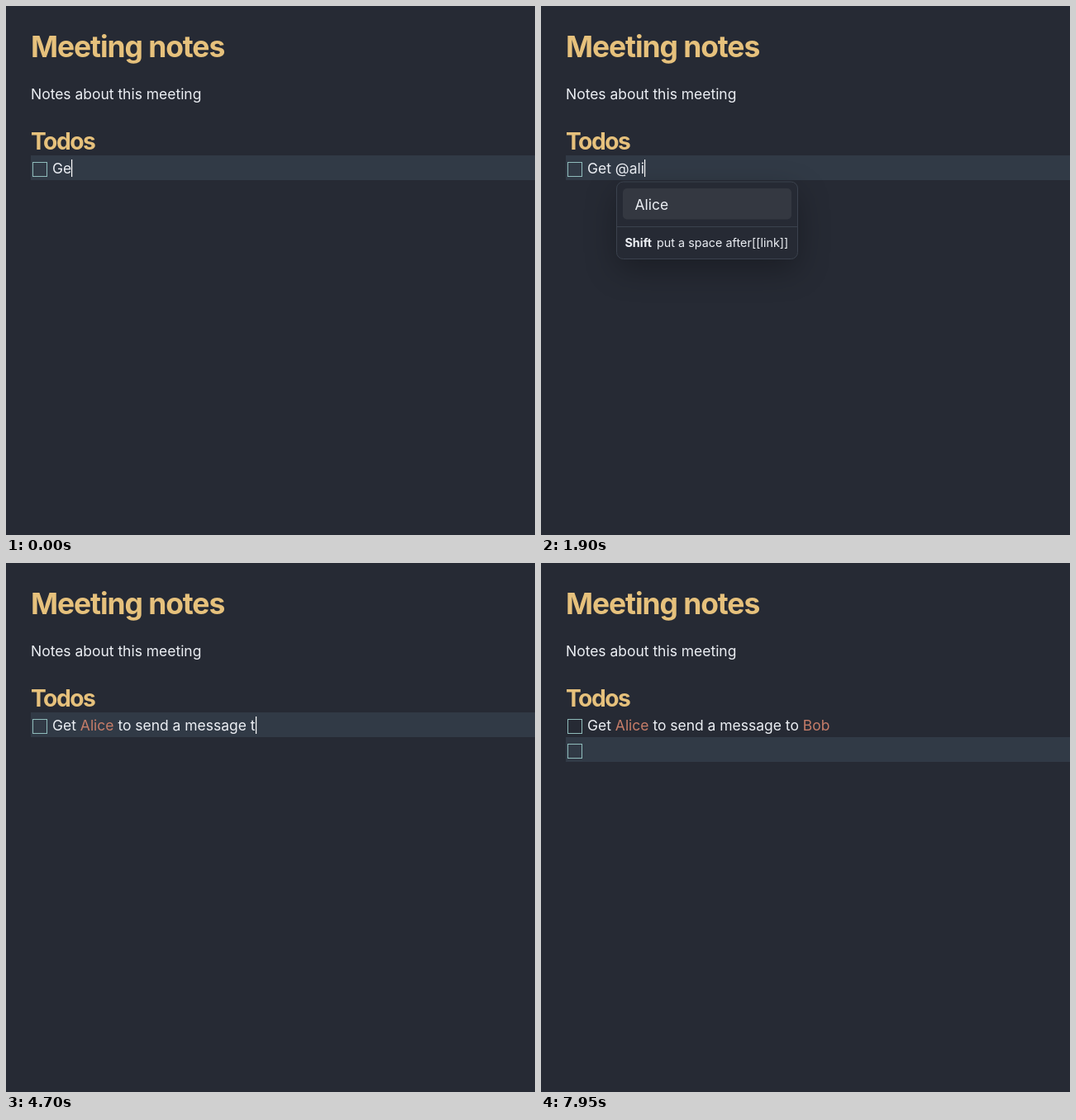
Animation of 640x641 px, one loop 8 s. Source, as an HTML page with a canvas:

```html
<!DOCTYPE html>
<html lang="en">
<head>
<meta charset="utf-8">
<title>Meeting notes</title>
<style>
  html, body { margin: 0; width: 100%; height: 100%; overflow: hidden; background: #262a34; }
  canvas { display: block; width: 640px; height: 641px; }
</style>
</head>
<body>
<canvas id="stage"></canvas>
<script>
const W = 640, H = 641, LOOP = 8000;
const FONT = 'Inter, "Liberation Sans", sans-serif';
const C = {
  bg: '#262a34', line: '#313a46', gold: '#e6c17c', text: '#eceff4',
  link: '#c67d69', box: '#8fbcbb', border: '#3b424e', pick: '#343841'
};
const NAMES = ['Alice', 'Bob', 'Carol', 'Dan', 'Eve', 'Faythe', 'Frank', 'Grace', 'Heidi'];
const SENTENCE = 'to send a message to ';
const TYPE_START = 2850, TYPE_STEP = 100;

// Moments of each key press or menu change, in ms
const AT = {
  t: 100, space: 250, at1: 900, a: 1300, l: 1450, i: 1600, alice: 2350,
  at2: 5150, b: 5400, o: 5600, bob: 6600, enter: 7050
};
const MENU_DELAY = 40, BLINK = 600;

const canvas = document.getElementById('stage');
const ctx = canvas.getContext('2d');
const dpr = window.devicePixelRatio || 1;
canvas.width = W * dpr;
canvas.height = H * dpr;

function setFont(size, weight, spacing) {
  ctx.font = `${weight} ${size}px ${FONT}`;
  ctx.letterSpacing = spacing + 'px';
}

function label(str, x, y, color) {
  ctx.fillStyle = color;
  ctx.fillText(str, x, y);
  return x + ctx.measureText(str).width;
}

function bodyFont() { setFont(17.5, 430, -0.02); }

function roundRect(x, y, w, h, r) {
  ctx.beginPath();
  ctx.roundRect(x, y, w, h, r);
}

function checkbox(y) {
  ctx.strokeStyle = C.box;
  ctx.lineWidth = 1;
  ctx.strokeRect(32.5, y + 8.5, 17, 17);
}

function typed(t, keys) {
  return keys.filter(([, when]) => t >= when).map(([ch]) => ch).join('');
}

// Text runs of the first task line: [string, color]
function taskRuns(t) {
  if (t < AT.alice) {
    return [['Ge' + typed(t, [['t', AT.t], [' ', AT.space], ['@', AT.at1],
      ['a', AT.a], ['l', AT.l], ['i', AT.i]]), C.text]];
  }
  const count = Math.max(0, Math.floor((t - TYPE_START) / TYPE_STEP) + 1);
  const runs = [['Get ', C.text], ['Alice', C.link], [' ' + SENTENCE.slice(0, count), C.text]];
  if (t >= AT.bob) runs.push(['Bob', C.link]);
  else runs.push([typed(t, [['@', AT.at2], ['b', AT.b], ['o', AT.o]]), C.text]);
  return runs;
}

function menuState(t) {
  if (t >= AT.at1 + MENU_DELAY && t < AT.alice) {
    const query = typed(t, [['a', AT.a], ['l', AT.l], ['i', AT.i]]);
    const items = NAMES.filter(n => {
      let from = 0;
      return [...query].every(ch => (from = n.toLowerCase().indexOf(ch, from) + 1) > 0);
    });
    return { x: 91.5, items };
  }
  if (t >= AT.at2 + MENU_DELAY && t < AT.bob) {
    return { x: 317.5, items: t < AT.b ? NAMES : ['Bob'] };
  }
  return null;
}

function drawMenu({ x, items }) {
  const top = 213, w = 219;
  const split = Math.min(267.5 + (items.length - 1) * 39, 574.5);
  const h = split + 39 - top;

  ctx.save();
  ctx.shadowColor = 'rgba(0,0,0,0.3)';
  ctx.shadowBlur = 38 * dpr;
  ctx.shadowOffsetY = 13 * dpr;
  ctx.fillStyle = C.bg;
  roundRect(x, top, w, h, 8);
  ctx.fill();
  ctx.restore();

  ctx.strokeStyle = C.border;
  ctx.lineWidth = 1;
  roundRect(x, top, w, h, 8);
  ctx.stroke();
  ctx.beginPath();
  ctx.moveTo(x, split);
  ctx.lineTo(x + w, split);
  ctx.stroke();

  ctx.fillStyle = C.pick;
  roundRect(x + 7.5, 221, 204, 37.5, 5);
  ctx.fill();

  bodyFont();
  items.forEach((name, i) => label(name, x + 22, 246.5 + i * 39, C.text));
  setFont(14.3, 700, 0);
  label('Shift', x + 10, split + 24.5, C.text);
  setFont(14.3, 430, 0.05);
  label('put a space after[[link]]', x + 48.5, split + 24.5, C.text);
}

function draw(t) {
  const onNext = t >= AT.enter;
  ctx.setTransform(dpr, 0, 0, dpr, 0, 0);
  ctx.fillStyle = C.bg;
  ctx.fillRect(0, 0, W, H);

  ctx.fillStyle = C.line;
  ctx.fillRect(30, onNext ? 211 : 181, W - 30, 30);

  setFont(35.5, 700, -1.1);
  label('Meeting notes', 30, 62, C.gold);
  setFont(28.2, 700, -1.5);
  label('Todos', 30, 174, C.gold);
  bodyFont();
  label('Notes about this meeting', 30, 113, C.text);

  checkbox(181);
  if (onNext) checkbox(211);

  let x = 56;
  for (const [str, color] of taskRuns(t)) x = label(str, x, 203, color);

  if (!onNext || t < AT.enter + BLINK) {
    ctx.fillStyle = '#fff';
    ctx.fillRect(onNext ? 56 : Math.round(x), onNext ? 216 : 186, 1.2, 21);
  }

  const menu = menuState(t);
  if (menu) drawMenu(menu);
}

const start = performance.now();
function frame() {
  draw((performance.now() - start) % LOOP);
  requestAnimationFrame(frame);
}
draw(0);
requestAnimationFrame(frame);
</script>
</body>
</html>
```
